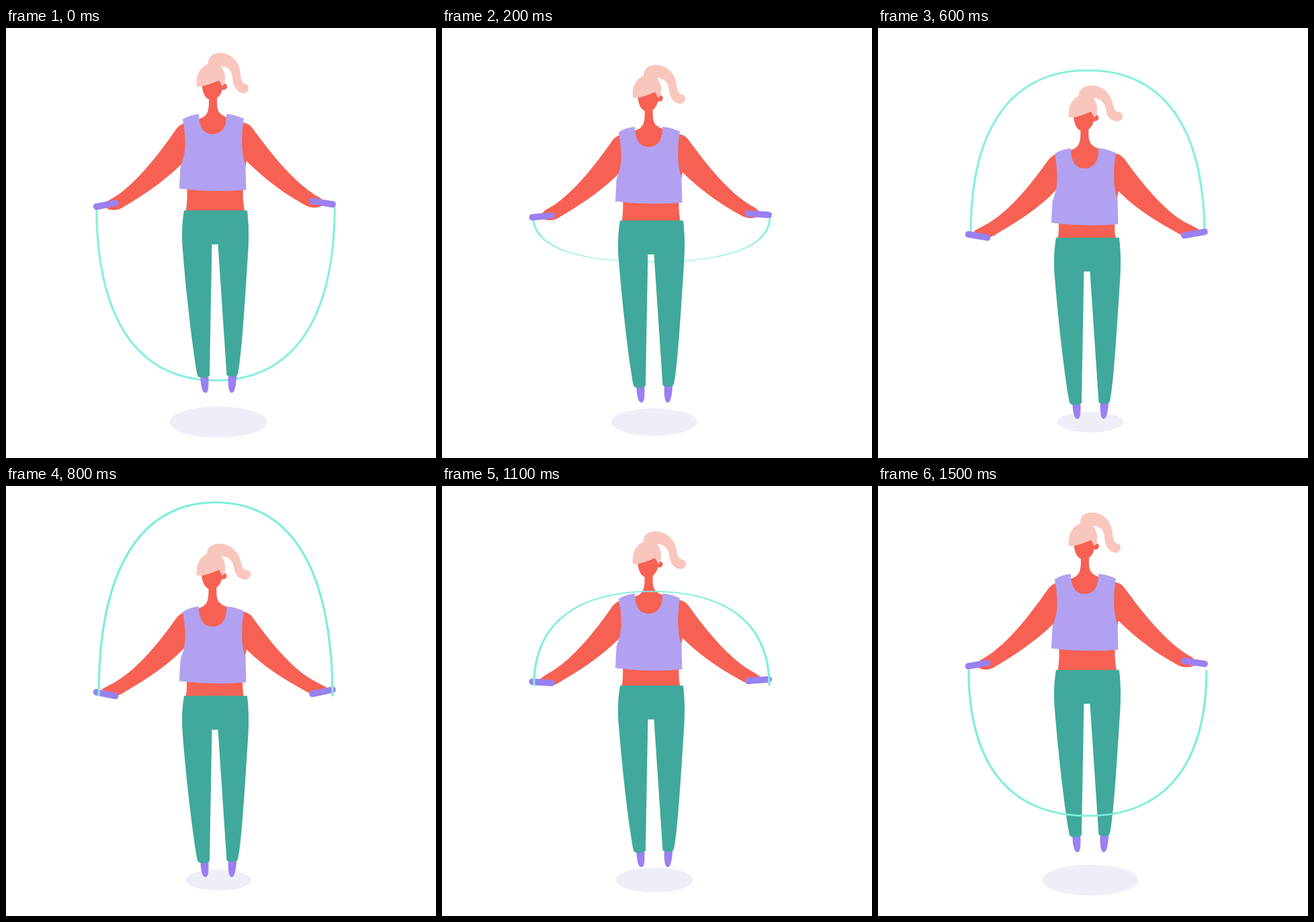
An HTML page for the animation above (1600 ms loop, 640x640 px).

```html
<!DOCTYPE html>
<html>
<head>
<meta charset="utf-8">
<title>Jump rope</title>
<style>
  html, body { margin: 0; height: 100%; overflow: hidden; background: #fff; }
  svg { display: block; width: 100vw; height: 100vh; }
  .skin { fill: #f66153; }
  .hair { fill: #f9c6bd; }
  .shirt { fill: #b2a1f0; }
  .pants { fill: #40a99b; }
  .accent { fill: #9a80f0; }
  .rope { fill: #7eeeda; }
</style>
</head>
<body>
<svg viewBox="0 0 640 640">
  <ellipse id="shadow" cx="316" cy="586.5" fill="#eeeef9"/>
  <path id="ropeBack" class="rope" opacity=".9"/>
  <path id="leftArm" class="skin"/>
  <path id="rightArm" class="skin"/>
  <path id="waist" class="skin"/>
  <g id="head">
    <path class="skin" d="M302 95V112C301.5 127 298 132 287 135.5L285 165H331V133.5C320 130 314 126 314 112V95Z"/>
    <path class="skin" d="M291.5 78C291 98 298 107 306 107S320 100 321.5 92C327 92.5 329 90 329 87S326 82 322 83V70H292Z"/>
  </g>
  <path id="ponytail" class="hair"/>
  <path id="hair" class="hair" d="M284 87C282 64 294 53 308 52C320 52 329 65 325.5 82L322 87L317 78C308 82 296 87 284 87Z"/>
  <g id="feet" class="accent">
    <path d="M289 512C289.5 530 291 543 297 543C302 543 302 530 301 512Z"/>
    <path d="M331 512C330 530 331 543 336 543C341 543 343 528 343.5 512Z"/>
  </g>
  <path id="pants" class="pants" d="M265 271.5H359C361.5 292 361.5 312 360.5 330C356 400 351 488 345 515Q344 518 341 518.5Q335 519.5 328.5 517L315.5 322H306.5L303 517.5Q296 522.5 287 519.5Q285 518 284.5 515C278 480 268 395 263 330C261 308 262 290 265 271.5Z"/>
  <path id="shirt" class="shirt" d="M263 136Q274 129 287 128C287 147 294 158 307.5 158S329 147 328 128Q342 129 354 135C350 160 350 188 356.5 203L357.5 241Q307 245 258 239L259.5 208C262 196 272 185 263 136Z"/>
  <rect id="leftGrip" class="accent" x="-19" y="-4.8" width="38" height="9.6" rx="4.3"/>
  <rect id="rightGrip" class="accent" x="-20" y="-4.8" width="40" height="9.6" rx="4.3"/>
  <path id="ropeFront" class="rope"/>
</svg>
<script>
const LOOP = 1600, STEP = 100, TURN = 800, LANDING = 700;
const $ = id => document.getElementById(id);

// Each pair holds the pose at the top of the jump and the pose near the ground.
const morphs = {
  leftArm: [
    'M275 138L264 142Q257 145 253 151C232 181 191 238 152 257L148 264Q148 271 160 271C168 271 172 268 177 265C206 248 236 227 262 202L275 190Z',
    'M275 184L264 188Q257 191 253 197C232 227 196 274 158 294L143 302Q148 314 167 311C171 310 173 309 177 306C206 289 240 268 264 242L275 232Z'],
  rightArm: [
    'M342 138L354 141Q361 142 366 148C388 178 428 232 468 253L473 260Q472 267 460 267.5C453 267 449 266 444 263C413 246 384 224 358 198L356.5 207L342 196Z',
    'M342 184L354 187Q361 188 366 194C390 227 426 274 461 291L478 300Q470 311 455 309C450 308 448 306 444 304C413 287 383 268 358 243L356 253L342 240Z'],
  waist: [
    'M269 235Q271 252 267.5 274H355.5Q351 252 353.5 235Z',
    'M268.5 284Q270 300 267.5 314H354Q351 300 353 284Z'],
  ponytail: [
    'M301 54C300 42 309 37 319 37C338 38 349 53 349 70C350 79 353 83 356 83C363 85 363 97 353 97C343 96 338 86 337 74C336 62 330 57 320 57L308 66Z',
    'M299 103C298 91 307 85.5 318 85.5C336 86 348 100 350 115C352 123 355 125 359 125C367 127 366 139 355 139C344 138 340 129 339 120C337 110 331 105 321 104L308 113Z']
};

function mix(from, to, k) {
  const end = to.match(/[\d.]+/g);
  let i = 0;
  return from.replace(/[\d.]+/g, n => (+n + (end[i++] - n) * k).toFixed(2));
}

function move(id, x, y, angle = 0) {
  $(id).setAttribute('transform', `translate(${x} ${y}) rotate(${angle})`);
}

// 0 at the top of the jump, about 1 on the ground
function drop(t) {
  if (t < LANDING) {
    const u = t / LANDING;
    return 1.04 * u * (1.1 + u * (.8 - .9 * u));
  }
  const w = (t - LANDING) / (LOOP - LANDING);
  return 1.04 * (1 - 2.8 * w * w + 1.8 * w ** 3);
}

function ropeMiddle(t) {
  if (t < TURN) {
    const u = t / TURN;
    return 524.5 - 500 * u * (1.36 + u * (.39 - .75 * u));
  }
  const x = (t - TURN) / 100;
  return 24.5 + x * (21.5 + (x - 1) * (11.33 - (x - 3) * (.952 + .145 * (x - 7))));
}

// A tapered band: full width at the grips, thinner when the rope is level with them
function ropePath(half, endY, midY) {
  const depth = midY - endY, side = Math.sign(depth), cx = 312, bulge = .65;
  const thick = Math.min(3, .2 + Math.abs(depth) / 90);
  const arch = (dir, grow) => {
    const r = half + 1.65 * grow, y = midY + side * grow * thick / 2;
    const shoulder = endY + bulge * (y - endY);
    return `${cx - dir * r} ${endY}C${cx - dir * r} ${shoulder} ${cx - dir * bulge * r} ${y} ${cx} ${y}` +
      `S${cx + dir * r} ${shoulder} ${cx + dir * r} ${endY}`;
  };
  return `M${arch(1, 1)}L${arch(-1, -1)}Z`;
}

function draw(t) {
  const p = drop(t);
  const swing = (p + (1 - Math.cos(2 * Math.PI * t / LOOP)) / 2) / 2;
  const inFront = t >= TURN;

  $('shadow').setAttribute('rx', 72.5 - 23.5 * p);
  $('shadow').setAttribute('ry', 23.3 - 7.8 * p);
  for (const id in morphs) $(id).setAttribute('d', mix(...morphs[id], p));

  move('head', -.6 * p, 46.5 * p);
  move('hair', 0, 46.5 * p);
  move('shirt', 0, 51 * p);
  move('pants', 0, 40.5 * p);
  move('feet', 0, 38.7 * p);
  move('leftGrip', 148.7, 263.2 + 46.2 * p, -11 + 22 * swing);
  move('rightGrip', 471, 260 + 46 * p, 9.5 - 21 * swing);

  const rope = ropePath(177.2 - 3.2 * p, 266 + 41 * p + (inFront ? 5.5 : 0), ropeMiddle(t));
  $('ropeBack').setAttribute('d', inFront ? '' : rope);
  $('ropeFront').setAttribute('d', inFront ? rope : '');
}

function tick() {
  draw(Math.floor(performance.now() % LOOP / STEP) * STEP);
  requestAnimationFrame(tick);
}
tick();
</script>
</body>
</html>
```
